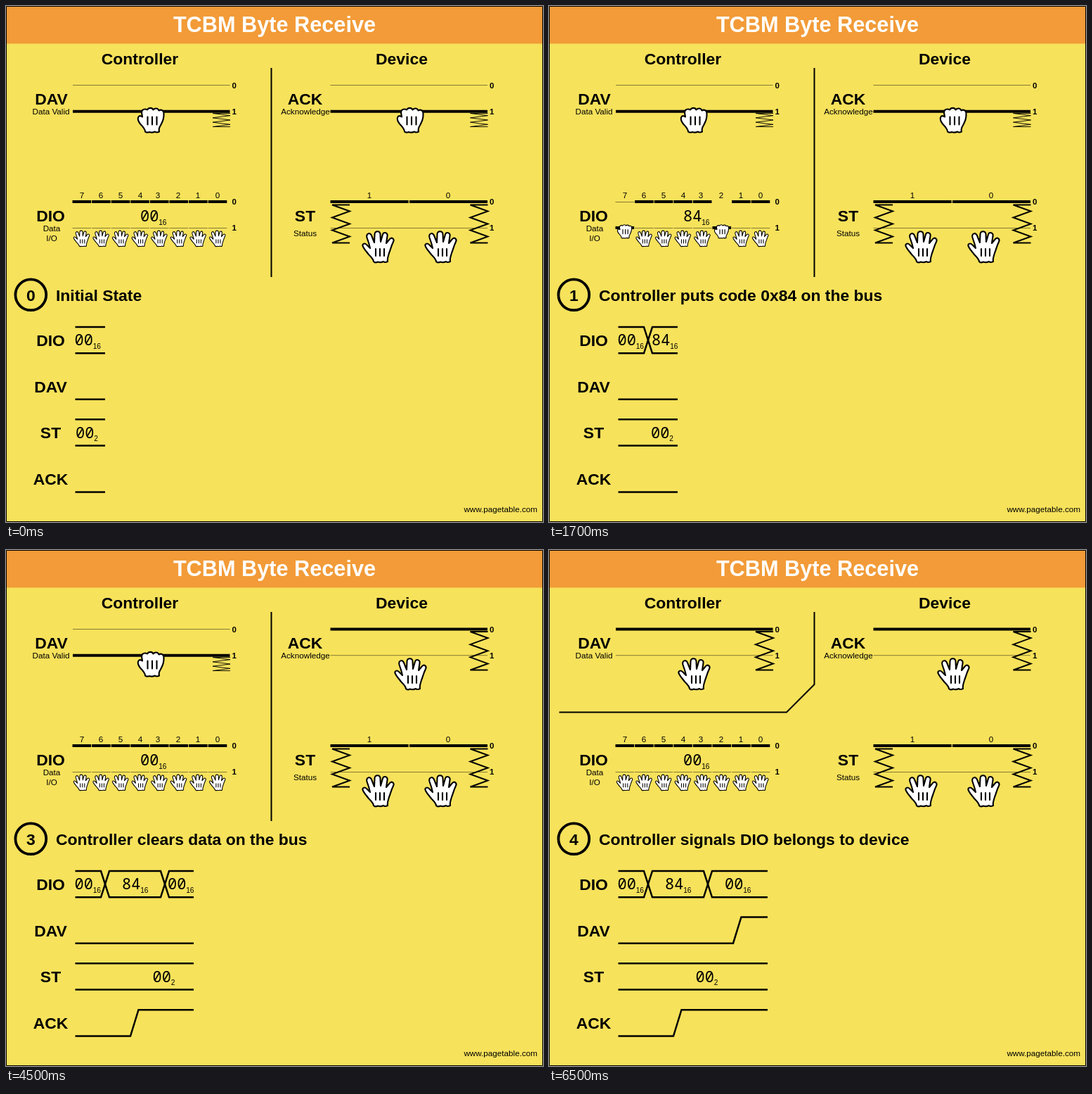
Recreate the animation shown at these times as an HTML page. Size 764 px wide and 733 px high, loop 8000 ms.

```html
<!DOCTYPE html>
<html lang="en">
<head>
<meta charset="utf-8">
<title>TCBM Byte Receive</title>
<style>
  html, body { margin: 0; width: 100%; height: 100%; overflow: hidden; background: #f7e25b; }
  svg { display: block; width: 764px; height: 733px; }
  text { font: 11.7px "Liberation Sans", Arial, sans-serif; }
  .mid { text-anchor: middle; }
  .end { text-anchor: end; }
  .big { font-weight: bold; font-size: 22.9px; }
  .title { font-weight: bold; font-size: 30.7px; fill: #fff; }
  .level { font-weight: bold; font-size: 11.5px; }
  .mono { font: 22px "Noto Sans Mono", monospace; }
  .sub { font-size: 10.2px; }
  path { fill: none; stroke: #000; }
  .thin { stroke: #857a35; stroke-width: 1; }
  .thick { stroke-width: 4; }
  .wave { stroke-width: 2.5; }
  .hand { fill: #fff; stroke-width: 2.1; stroke-linejoin: round; stroke-linecap: round; }
</style>
</head>
<body>
<svg id="stage" viewBox="0 0 764 733"></svg>
<script>
const OPEN = 'M17 44C17 41 13 37 10 34C7 30 4 27 2 23C0 19 4 17 7 20L12 25C11 20 9 14 7.5 10' +
  'C6 4 12 2 14 7L18 17L18.5 5C19 0 26 0 26.5 5L27 16L30 5.5C31.5 1 37.5 3 36.5 8L35 18L40 12' +
  'C43 9 47 12 45 16C42 22 41 27 39 32C38 36 36 40 37 44Q33 46 31 44Q27 46 23 44.5Q19 46.5 17 44Z' +
  'M20 26V36M26 26V36M32 26V36';
const FIST = 'M12 35C12 31 8 27 5 24C2 20 1 18 2 15C3 12 5 12 8 14L7 8C7 3 12 2 15 4' +
  'C17 .5 22 .5 23.5 4C26 1 30.5 1.5 31.5 5C35 3 38.5 5 38.5 9C39 16 37 20 34 26C32 29 31 32 32 35' +
  'Q28 37 26 35Q22 37 18 35.5Q14 37 12 35ZM15.5 14V25M22 14V25M28.5 14V25';

const STEPS = [
  'Initial State',
  'Controller puts code 0x84 on the bus',
  'Device has accepted the code',
  'Controller clears data on the bus',
  'Controller signals DIO belongs to device'
];
const ENDS = [141, 183, 225, 267, 311];
const START = 98.5;

const text = (x, y, s, cls = 'mid') => `<text x="${x}" y="${y}" class="${cls}">${s}</text>`;
const path = (d, cls, more = '') => `<path d="${d}" class="${cls}" ${more}/>`;
const line = (x1, x2, y, cls) => path(`M${x1} ${y}H${x2}`, cls);
const hand = (shape, x, y, k = 1) =>
  path(shape, 'hand', `transform="translate(${x} ${y}) scale(${k})"`);
const value = (x, y, s, base) =>
  text(x, y, s, 'mono') + text(x + 26.2, y + 4.5, base, 'sub');
const levels = (x, y) => text(x, y + 4, 0, 'level') + text(x, y + 41, 1, 'level');

function spring(x, y, h, weight) {
  let d = `M${x + 25} ${y}H${x}`;
  for (let i = 1; i <= 6; i++) d += `L${i % 2 ? x + 25 : x} ${y + h * i / 6}`;
  return path(d + `H${x + 25}`, '', `stroke-width="${weight}"`);
}

// A control line with one hand: pulled down to 1, or sprung back up to 0
function wire(x, mid, released) {
  const [top, low] = released ? ['thick', 'thin'] : ['thin', 'thick'];
  return line(x, x + 223.5, 112.5, top) + line(x, x + 223.5, 149.7, low) +
    (released
      ? spring(x + 199, 116, 54.5, 2) + hand(OPEN, mid - 23, 153)
      : spring(x + 199, 152.5, 19, 0.9) + hand(FIST, mid - 20, 143.5)) +
    levels(x + 226.5, 112.5);
}

function dataBits(code) {
  let s = '';
  for (let i = 0; i < 8; i++) {
    const x = 94.5 + 27.6 * i, end = x + 26.6;
    const low = code >> (7 - i) & 1;
    s += text([108, 135, 163, 191, 216, 245, 273, 301][i], 272.5, 7 - i);
    if (low) {
      if (!i) s += line(x, end, 278.5, 'thin');
      s += line(x, end, 315, 'thick') + hand(FIST, x + 2, 310, 0.55);
    } else {
      s += line(x, end, 278, 'thick') + line(x, end, 315.5, 'thin') +
        hand(OPEN, x + 1, 318.5, 0.51);
    }
  }
  return s + value(191, 306, code ? '84' : '00', 16) + levels(321.5, 278);
}

function statusBits() {
  return text(517, 272.5, 1) + text(629, 272.5, 0) +
    line(461.5, 572.7, 278, 'thick') + line(574, 685, 278, 'thick') +
    line(461.5, 685, 315.5, 'thin') +
    spring(464, 282.5, 54, 2) + spring(660.5, 282.5, 54, 2) +
    hand(OPEN, 506, 319) + hand(OPEN, 595, 319) + levels(688, 278);
}

// Two mirrored bus traces that swap at each crossing
function bus(y, end, crossings) {
  let a = `M${START} ${y}`, b = `M${START} ${y + 37.3}`, flip = false;
  for (const x of crossings) {
    const top = flip ? y + 37.3 : y, low = flip ? y : y + 37.3;
    a += `L${x - 6} ${top}L${x + 6} ${low}`;
    b += `L${x - 6} ${low}L${x + 6} ${top}`;
    flip = !flip;
  }
  return path(a + `H${end}`, 'wave') + path(b + `H${end}`, 'wave');
}

const signal = (y, end, rise) => path(
  `M${START} ${y}` + (rise + 12 < end ? `H${rise}l11.5 -37.3` : '') + `H${end}`, 'wave');

function timing(step) {
  const end = ENDS[step];
  let s = bus(456, end, [141, 226].filter(x => x + 6 < end)) + value(97.5, 482, '00', 16);
  if (step > 0) s += value(step > 1 ? 165 : 146, 482, '84', 16);
  if (step > 2) s += value(step > 3 ? 250 : 230, 482, '00', 16);
  return s + signal(558.7, end, 262) + bus(587.3, end, []) +
    value([99, 145, 189, 208.5, 208.5][step], 613.5, '00', 2) +
    signal(690.5, end, 177);
}

const big = (x, y, s) => text(x, y, s, 'big mid');
const fixed =
  '<rect width="764" height="733" fill="#f7e25b"/><rect width="764" height="53.5" fill="#f29b38"/>' +
  text(382, 37, 'TCBM Byte Receive', 'title mid') +
  big(190.5, 83, 'Controller') + big(563, 83, 'Device') +
  big(64.5, 140, 'DAV') + text(64, 154, 'Data Valid') +
  big(425.5, 140, 'ACK') + text(426, 154, 'Acknowledge') +
  big(63.5, 306, 'DIO') + text(65, 320, 'Data') + text(65, 334, 'I/O') +
  big(425.5, 306, 'ST') + text(425.5, 327, 'Status') +
  ['DIO', 'DAV', 'ST', 'ACK'].map((s, i) => big(63.5, 483 + 65.7 * i, s)).join('') +
  '<circle cx="35.3" cy="410.3" r="21.9" fill="none" stroke="#000" stroke-width="3.8"/>' +
  text(756, 719, 'www.pagetable.com', 'end') +
  path('M.5 .5H763.5V732.5H.5Z', '') + statusBits();

const scene = step => fixed +
  path(step < 4 ? 'M377.5 88V385' : 'M377.5 88V191L338 230.5H14.5', '', 'stroke-width="2"') +
  wire(95, 206, step > 3) + wire(461.5, 575, step > 1) +
  dataBits(step == 1 || step == 2 ? 0x84 : 0) +
  big(35.3, 418.5, step) + text(71, 418.5, STEPS[step], 'big') + timing(step);

const stage = document.getElementById('stage');
let shown = -1;
function draw() {
  const step = Math.floor((performance.now() % 8000 + 1500) / 2000);
  if (step != shown) stage.innerHTML = scene(shown = step);
  requestAnimationFrame(draw);
}
draw();
</script>
</body>
</html>
```
